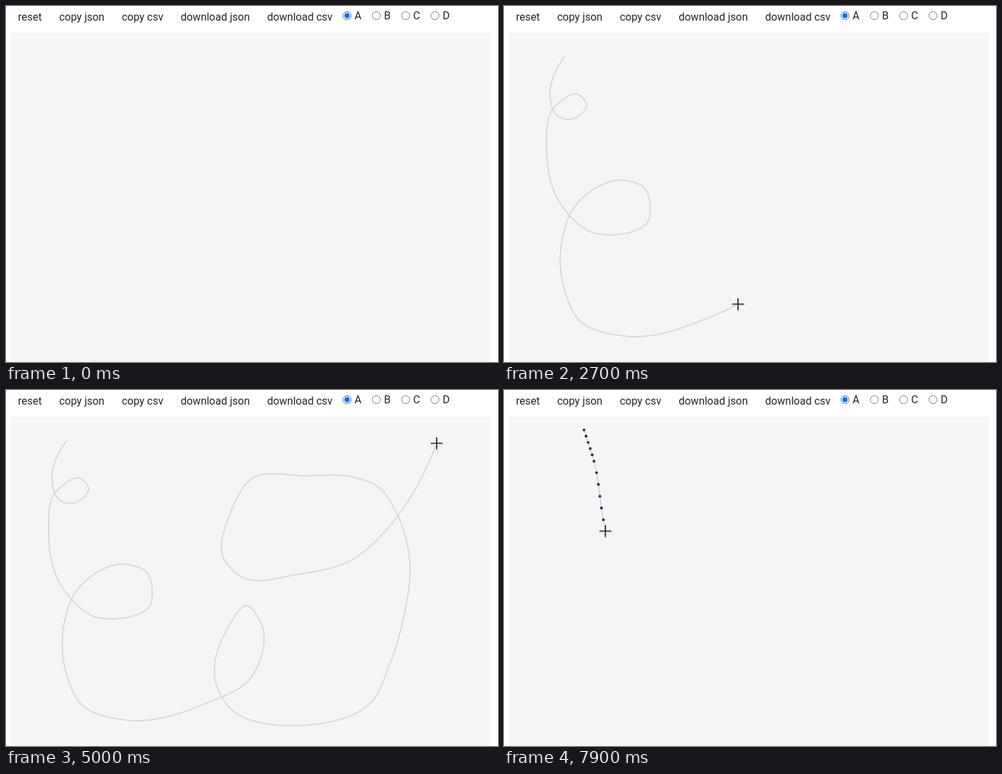
Recreate the animation shown at these times as an HTML page. Size 738 by 535 pixels, loop 8 s.

```html
<!DOCTYPE html>
<html lang="en">
<head>
<meta charset="utf-8">
<title>Freehand drawing</title>
<style>
  html, body { margin: 0; width: 100%; height: 100%; overflow: hidden; background: #fff; }
  body { font: 16px/19px Roboto, sans-serif; color: #212529; }
  #area, #ring, #buttons, #radios, svg { position: absolute; }
  #area { left: 7px; top: 40px; width: 720px; height: 495px; background: #f5f5f5; }
  #ring { left: 5px; top: -10px; width: 62px; height: 51px; box-sizing: border-box;
    border: 2px solid #d3e6f6; border-radius: 5px; background: #fff; }
  #ring.wide { left: 4px; width: 65px; height: 54px; border: 3px solid #bfdeff; }
  #buttons { left: 7px; top: 7px; white-space: nowrap; }
  #buttons span { display: inline-block; padding: 0 11px; }
  #radios { left: 504.9px; top: 5px; display: flex; gap: 15.9px; }
  label { display: flex; align-items: center; gap: 4.9px; }
  input { margin: 0; width: 13px; height: 13px; accent-color: #1a6fdc; }
  svg { left: 0; top: 0; width: 738px; height: 535px; }
  .line { fill: none; stroke: #d9d9d9; stroke-width: 2; stroke-linejoin: round; }
  .dots { fill: #371c55; }
</style>
</head>
<body>
<div id="area"></div>
<div id="ring"></div>
<div id="buttons">
  <span>reset</span>
  <span>copy json</span>
  <span>copy csv</span>
  <span>download json</span>
  <span>download csv</span>
</div>
<div id="radios">
  <label><input type="radio" name="set" checked>A</label>
  <label><input type="radio" name="set">B</label>
  <label><input type="radio" name="set">C</label>
  <label><input type="radio" name="set">D</label>
</div>
<svg viewBox="0 0 738 535">
  <g id="strokes"></g>
  <g id="cross" fill="none">
    <path d="M-9 0H10M0 -9V10" stroke="#000" stroke-opacity=".15" stroke-width="4" transform="translate(.5 1)"/>
    <path d="M-10 0H10M0 -10V10" stroke="#fff" stroke-width="3.6"/>
    <path d="M-9 0H9M0 -9V9" stroke="#1a1a1a" stroke-width="1.7"/>
  </g>
  <path id="hand" fill="#fff" stroke="#222" stroke-width="1.3" stroke-linejoin="round" transform="translate(39 25)"
    d="M5 10V2.5a1.5 1.5 0 0 1 3 0V7l6 1.2q2 .5 2 2.3v2q0 2-1 4H7.5L2 11q-1.6-1.8 0-2.2q1-.3 3 1.2z"/>
</svg>
<script>
const LOOP = 8000, STEP = 100;
const SAMPLE = 16.65;   // ms between two pointer samples
const PER_KNOT = 5;     // samples between two knots of a stroke
const RELEASE = 5100, RESET = 7000;

const byId = id => document.getElementById(id);
const show = (node, on) => { node.style.display = on ? '' : 'none'; };
const clamp = (v, low, high) => Math.min(Math.max(v, low), high);
const progress = (t, from, to) => clamp((t - from) / (to - from), 0, 1);
const mix = (a, b, f) => a.map((v, k) => v + (b[k] - v) * f);

function add(parent, tag, attrs) {
  const node = document.createElementNS('http://www.w3.org/2000/svg', tag);
  for (const key in attrs) node.setAttribute(key, attrs[key]);
  return parent.appendChild(node);
}

// Smooth curve through knots, close to even speed within each segment.
function makeCurve(knots) {
  const last = knots.length - 1;
  const gap = i => Math.hypot(knots[i + 1][0] - knots[i][0], knots[i + 1][1] - knots[i][1]);
  const slope = (i, k) => (knots[i + 1][k] - knots[i][k]) / gap(i);
  const tangent = (i, k) => {
    if (i === 0) return slope(0, k);
    if (i === last) return slope(last - 1, k);
    const before = gap(i - 1), after = gap(i);
    return (slope(i - 1, k) * after + slope(i, k) * before) / (before + after);
  };
  return u => {
    const i = Math.min(Math.floor(u), last - 1), s = u - i, r = 1 - s, h = gap(i);
    return [0, 1].map(k =>
      r * r * (1 + 2 * s) * knots[i][k] + s * s * (3 - 2 * s) * knots[i + 1][k] +
      h * s * r * (r * tangent(i, k) - s * tangent(i + 1, k)));
  };
}

function makeStroke(start, points) {
  const knots = points.split(' ').map(pair => pair.split(',').map(Number));
  const count = (knots.length - 1) * PER_KNOT;
  const curve = makeCurve(knots);
  const at = sample => curve(sample / PER_KNOT);
  const line = add(byId('strokes'), 'path', { class: 'line' });
  const group = add(byId('strokes'), 'g', { class: 'dots' });
  const dots = Array.from({ length: count + 1 }, (_, i) => {
    const [cx, cy] = at(i);
    return add(group, 'circle', { cx, cy, r: 2.1 });
  });
  const sampleAt = t => clamp((t - start) / SAMPLE, 0, count);

  function draw(t, visible, dotted) {
    const end = sampleAt(t), path = [];
    for (let i = 0; i < end; i += 0.5) path.push(at(i));
    path.push(at(end));
    line.setAttribute('d', 'M' + path.map(p => p.map(v => v.toFixed(2))).join('L'));
    show(line, visible);
    dots.forEach((dot, i) => show(dot, visible && dotted && i <= end));
  }
  return { start, draw, penAt: t => at(sampleAt(t)) };
}

const loops = makeStroke(1060,
  '91,75 77,99 69,130 81,166 102,170 124,148 112,133 75,153 64,217 81,291 134,341 217,322 ' +
  '210,273 182,262 104,304 88,347 87,411 117,476 180,496 300,471 367,433 384,354 362,324 ' +
  '330,362 314,437 334,476 443,504 550,467 575,414 596,344 605,251 585,183 559,146 521,131 ' +
  '451,129 369,133 336,186 326,252 352,280 438,277 521,254 569,212 607,161 638,100 646,80');
const tail = makeStroke(7715, '120,60 135,107 149,195 165,272');

// Sweep from the end of the drawing to the reset button, dipping on the way.
function sweep(p) {
  return [53 + 593 * (1 - p * p) ** 5.5, 80 - 41 * p + 44 * Math.sin(Math.PI * p)];
}

function crossAt(t) {
  if (t < loops.start) return mix([97, 53], loops.penAt(0), progress(t, 700, 1000));
  if (t <= 5400) return loops.penAt(t);
  if (t < RESET) return sweep(progress(t, 5400, 6300));
  if (t < tail.start) return mix([48, 36], tail.penAt(0), progress(t, 7400, 7700));
  return tail.penAt(t);
}

function render(t) {
  loops.draw(t, t >= loops.start && t < RESET, t >= RELEASE);
  tail.draw(t, t >= tail.start, true);

  const pointing = t >= 6400 && t < 7500;
  show(byId('ring'), pointing && t >= RESET);
  byId('ring').className = t >= 7200 ? 'wide' : '';
  show(byId('hand'), pointing);
  show(byId('cross'), t >= 700 && !pointing);
  byId('cross').setAttribute('transform', `translate(${crossAt(t).map(Math.round)})`);
}

const start = performance.now();
let shown = -1;
function tick() {
  const t = Math.floor((performance.now() - start) % LOOP / STEP) * STEP;
  if (t !== shown) render(shown = t);
  requestAnimationFrame(tick);
}
tick();
</script>
</body>
</html>
```
